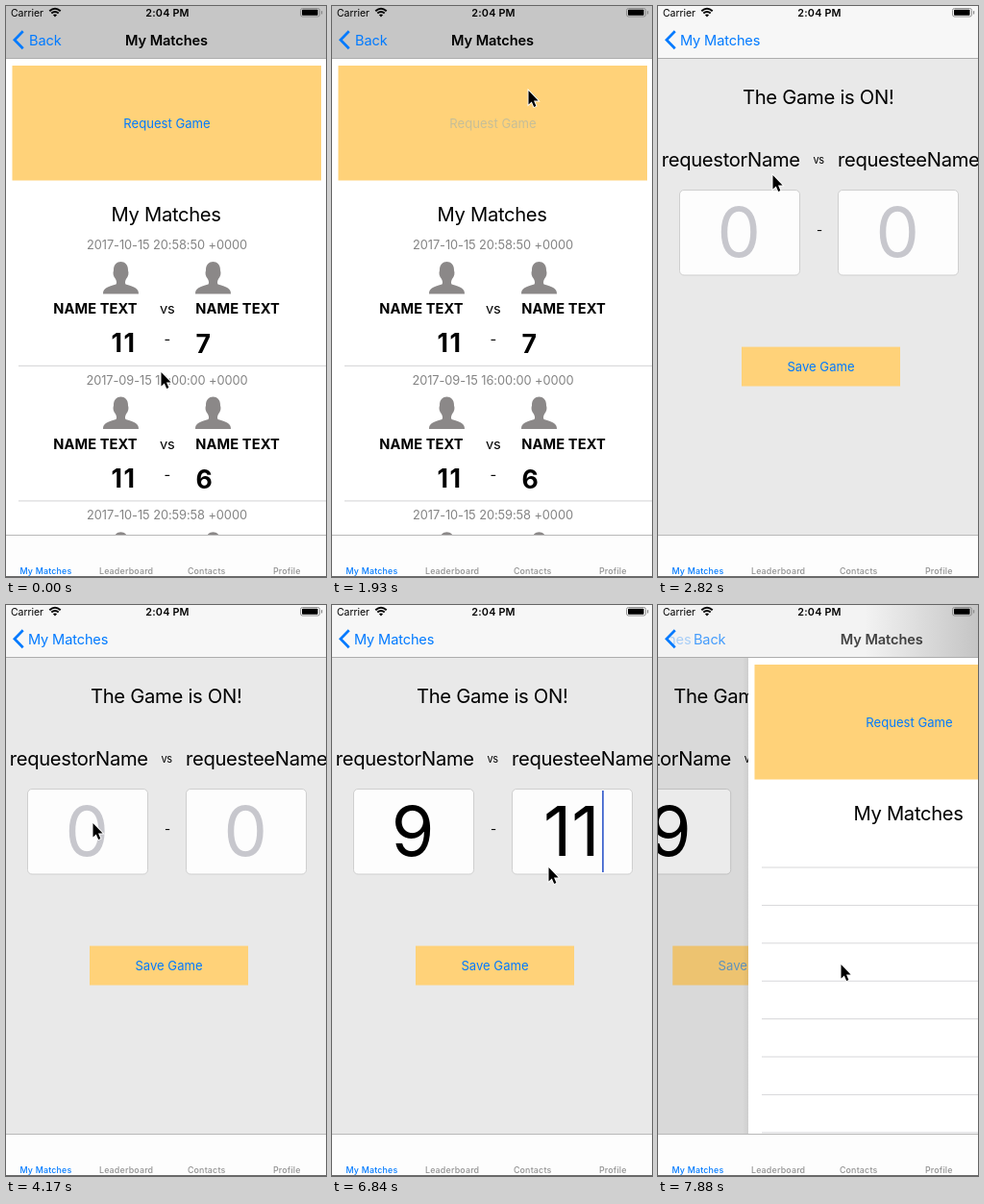
Animation of 333 by 594 pixels, one loop 8 s. Source, as an HTML page:

```html
<!DOCTYPE html>
<html lang="en">
<head>
<meta charset="utf-8">
<title>Match score</title>
<style>
html, body { margin: 0; width: 100%; height: 100%; overflow: hidden; background: #fff }
svg { display: block; width: 333px; height: 594px; font-family: Inter, Roboto, sans-serif; letter-spacing: -.02em }
</style>
</head>
<body>
<svg id="stage" viewBox="0 0 333 594"></svg>
<script>
const LOOP = 8000, TICK = 148.6, W = 333;
const BLUE = '#007aff', ORANGE = '#ffd279';
const stage = document.getElementById('stage');

// Pointer path: tick, x, y
const POINTER = [
  [0, 161, 381], [1, 163, 375], [4, 166, 415], [5, 166, 415], [6, 166, 419], [7, 166, 419],
  [8, 174, 340], [9, 196, 160], [10, 208, 47], [11, 204, 88], [15, 204, 88],
  [17, 165, 138], [19, 119, 176], [20, 105, 195], [22, 90, 227], [32, 90, 227],
  [34, 180, 240], [36, 231, 249], [45, 231, 249], [48, 212, 322], [50, 190, 374], [54, 190, 374]
];

const text = (s, x, y, size, more = '') =>
  `<text x="${x}" y="${y}" font-size="${size}" ${more}>${s}</text>`;
const rect = (x, y, w, h, fill, more = '') =>
  `<rect x="${x}" y="${y}" width="${w}" height="${h}" fill="${fill}" ${more}/>`;
const group = (x, y, body) => `<g transform="translate(${x} ${y})">${body}</g>`;
const fill = (color, opacity = 1) => `fill="${color}" opacity="${opacity}"`;
const spaced = em => `letter-spacing="${em}em" `;
const MID = 'text-anchor="middle" ';
const BOLD = 'font-weight="700" ';

// Opacity of a button label pressed at a given tick, then released
const pressed = (k, at) => k < at ? 1 : k === at ? .22 : .6;

function pointerAt(k) {
  const i = Math.max(1, POINTER.findIndex(p => p[0] >= k));
  const [t0, x0, y0] = POINTER[i - 1], [t1, x1, y1] = POINTER[i];
  const f = (k - t0) / (t1 - t0);
  return [Math.round(x0 + (x1 - x0) * f), Math.round(y0 + (y1 - y0) * f)];
}

const person = x => group(x, 266, `<path fill="#8b8888" d="M-18.5 33.5C-18.5 28-15 26.5-5 23.5
  C-4 22-4.5 20-5.5 18C-8 15-8.5 12-7.5 9C-8-3 8-3 7.5 9C8.5 12 8 15 5.5 18
  C4.5 20 4 22 5 23.5C15 26.5 18.5 28 18.5 33.5Z"/>`);

const match = (i, date, a, b) => group(0, i * 140.6,
  text(date, 167.5, 253, 12.8, MID + spaced(-.005) + fill('#848484')) +
  person(119.5) + person(215.5) +
  text('NAME TEXT', 49.2, 320, 14.6, BOLD + spaced(.008)) +
  text('NAME TEXT', 197.3, 320, 14.6, BOLD + spaced(.008)) +
  text('vs', 160, 320, 14.6) + text('-', 164.5, 352, 14.6) +
  text(a, 109.6, 360, 26.6, BOLD + spaced(.05)) + text(b, 197.5, 361, 26.6, BOLD) +
  rect(13, 373.8, 320, 1, '#d2d2d4'));

function listPage(rows, opacity) {
  const lines = Array.from({ length: 8 }, (_, i) => rect(14, 272.5 + i * 39.4, 320, 1, '#d8d8da'));
  return rect(0, 55, W, 496, '#fff') + rect(6.5, 62, 321.5, 119.5, ORANGE) +
    text('Request Game', 167.5, 127, 13.1, MID + spaced(0) + fill(BLUE, opacity)) +
    text('My Matches', 166.6, 224, 20.2, MID) +
    (rows ? match(0, '2017-10-15 20:58:50 +0000', '11', '7') +
      match(1, '2017-09-15 16:00:00 +0000', '11', '6') +
      match(2, '2017-10-15 20:59:58 +0000', '', '') : lines.join(''));
}

const field = (x, value) => rect(x + .5, 191.5, 125, 88.5, '#fdfdfd', 'rx="4.5" stroke="#cfcfcf"') +
  text(value || '0', x + 62.2, 261, 72, MID + spaced(0) + fill(value ? '#000' : '#c7c7cd'));

function caret(k) {
  const bar = (x, o = 1) => rect(x, 193, 1.8, 85, '#4468cf', `opacity="${o}"`);
  if (k >= 44) return bar(281);
  if (k >= 42) return bar(265);
  if (k >= 38) return bar(226.8);
  if (k >= 30 && k < 35) return bar(105.5);
  if (k >= 25 && k < 28) return bar(61.8, k < 27 ? 1 : .5);
  return '';
}

function gamePage(k) {
  const left = k >= 30 ? '9' : '', right = k >= 44 ? '11' : k >= 42 ? '1' : '';
  return rect(0, 55, W, 496, '#e9e9e9') +
    text('The Game is ON!', 166.7, 102, 20.3, MID) +
    text('requestorName', 3.8, 167, 20.2) + text('requesteeName', 187, 167, 20.2) +
    text('vs', 161.5, 164, 11) + text('-', 165, 238, 13.3) +
    field(22, left) + field(187, right) + caret(k) +
    rect(87, 354.6, 165, 40.9, ORANGE) +
    text('Save Game', 169.5, 380, 13.1, MID + spaced(0) + fill(BLUE, pressed(k, 52)));
}

// The new page slides in over the old one, which drifts left and darkens.
function push(from, to, p) {
  const edge = W * (1 - p);
  const over = p ? rect(0, 55, W, 496, '#000', `opacity="${.1 * p}"`) +
    rect(edge - 6, 55, 6, 496, 'url(#shade)') + group(edge, 0, to) : '';
  return group(-100 * p, 0, from) + over;
}

function gradient(id, x1, x2, a, b) {
  return `<linearGradient id="${id}" gradientUnits="userSpaceOnUse" x1="${x1}" x2="${x2}" y1="0" y2="0">
    <stop stop-color="${a}"/><stop offset="1" stop-color="${b}"/></linearGradient>`;
}

function navBar(p, q) {
  const tint = q ? gradient('tint', W * (1 - q) + 121, W * (1 - q) + 245, '#f3f3f3', '#c2c2c2')
    : gradient('tint', 425 * (1 - p) - 48, 425 * (1 - p) - 2, '#c6c6c6', '#f7f7f7');
  const item = (s, x, color, o, more = spaced(-.01)) => text(s, x, 40.5, 14.6, more + fill(color, o));
  const back = (x, o) => item('Back', x, BLUE, o);
  const label = (x, o) => item('My Matches', x, BLUE, o);
  const title = (x, o) => item('My Matches', x, '#000', o, 'font-weight="600" ' + spaced(-.005));
  const x = 23 + 101 * (1 - p) + (p && p < 1 ? 1.5 : 0);
  const items = q ? label(23 - 100 * q, .3) + back(24 + 46 * (1 - q), q) + title(124 + 233 * (1 - q), q)
    : back(24 - 100 * p, 1 - p) + label(x, p) + title(x, 1 - p);
  return `<defs>${tint}<clipPath id="items"><path d="M13 18H333V54H13Z"/></clipPath></defs>` +
    rect(0, 0, W, 54, 'url(#tint)') + rect(0, 54, W, 1, '#adadad') +
    `<g clip-path="url(#items)">${items}</g>
    <path d="M17.7 26.3L8.9 35.3L17.7 44.3" fill="none" stroke="${BLUE}" stroke-width="2.7"/>`;
}

const statusBar = () => text('Carrier', 5, 10.7, 10.5, spaced(-.005)) +
  text('2:04 PM', 168, 10.7, 10.8, MID + 'font-weight="600" ' + spaced(.018)) +
  `<path d="M45.3 5.2Q51 .2 56.7 5.2M47.3 7.6Q51 4.4 54.7 7.6" fill="none" stroke="#000" stroke-width="2"/>
  <path d="M51 11.4L48.9 9.3Q51 7.5 53.1 9.3Z"/>` +
  rect(306.5, 2.5, 20, 8.5, 'none', 'rx="2" stroke="#888" stroke-width=".9"') +
  rect(308, 3.7, 16.5, 6.1, '#000', 'rx=".8"') + rect(328, 5, 1.2, 3.5, '#888', 'rx=".6"');

const tabBar = () => rect(0, 550, W, 44, '#fdfdfd') + rect(0, 550, W, 1, '#b8b8b8') +
  ['My Matches', 'Leaderboard', 'Contacts', 'Profile'].map((s, i) =>
    text(s, 41.5 + i * 83.6, 591, 8.9, MID + 'font-weight="500" ' + spaced(.02) +
      fill(i ? '#929292' : BLUE))).join('') +
  rect(0, 593, W, 1, '#6b6b6b');

function pointer(k) {
  const [x, y] = pointerAt(k);
  return group(x, y, `<path d="M.5 0V14.5L3.8 11.4L6.2 16.9L8.4 15.9L6 10.6H10.6Z"
    stroke="#fff" stroke-width="1.8" paint-order="stroke"/>`);
}

function draw(k) {
  const p = 1 - Math.exp(-1.868 * Math.max(0, k - 13));
  const q = 1 - Math.exp(-1.265 * Math.max(0, k - 52));
  const game = gamePage(k), first = p > .998 ? 1 : p;
  const shade = `<defs><linearGradient id="shade"><stop stop-opacity="0"/><stop offset="1" stop-opacity=".05"/></linearGradient></defs>`;
  stage.innerHTML = shade +
    (q ? push(game, listPage(false, 1), q) : push(listPage(true, pressed(k, 13)), game, first)) +
    navBar(first, q) + statusBar() + tabBar() + pointer(k);
}

let shown = -1;
function frame(now) {
  const k = Math.floor((now % LOOP) / TICK + .05);
  if (k !== shown) draw(shown = k);
  requestAnimationFrame(frame);
}
draw(0);
requestAnimationFrame(frame);
</script>
</body>
</html>
```
